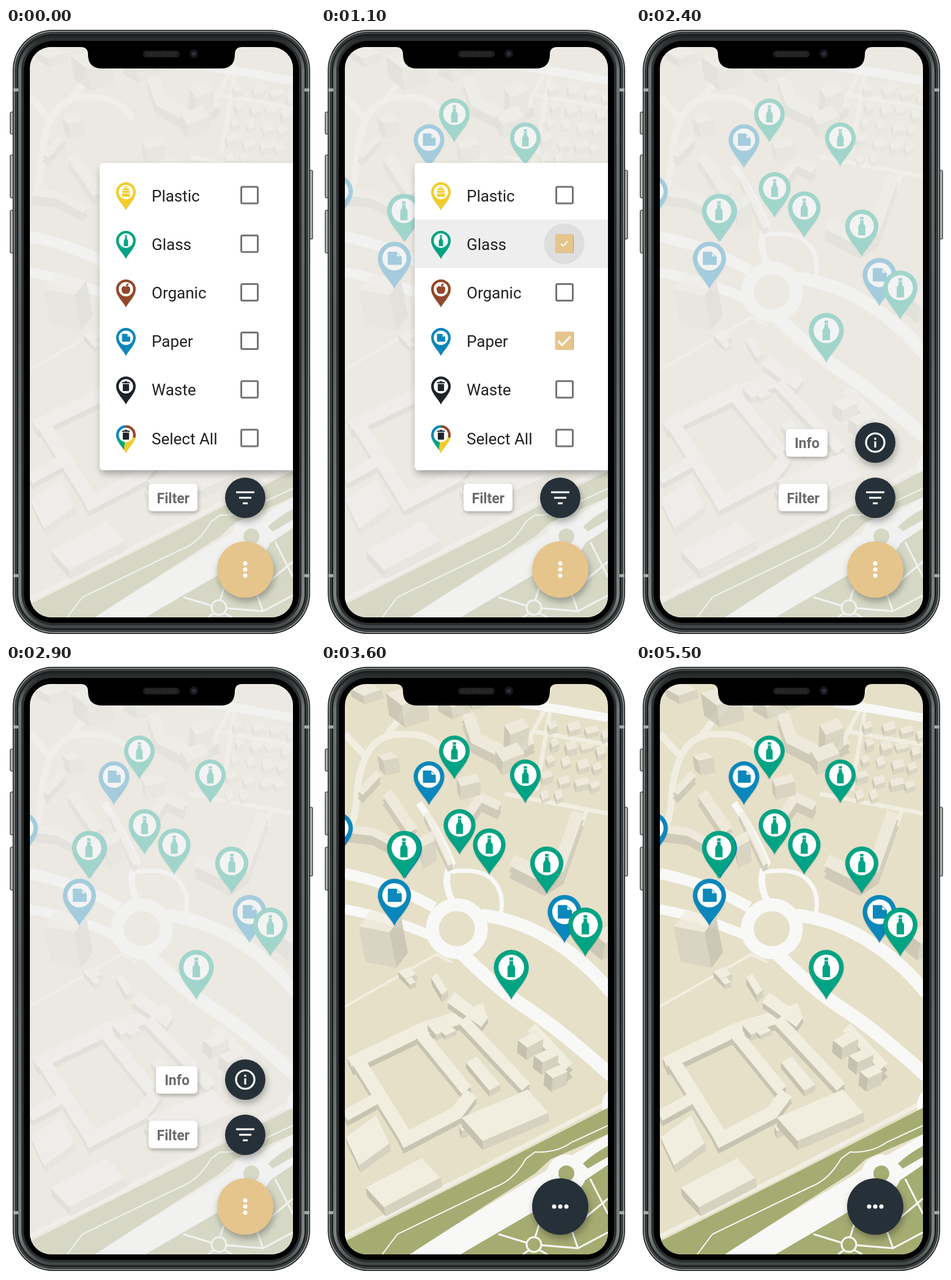
Write an HTML page that moves like this. It is 505 px wide and 993 px high and loops after 5600 ms.

```html
<!DOCTYPE html>
<html lang="en">
<head>
<meta charset="utf-8">
<title>Recycling map filter</title>
<style>
html, body { margin: 0; width: 100%; height: 100%; overflow: hidden; background: #fff; }
svg { display: block; width: 100vw; height: 100vh; }
text { font: 26px Roboto, sans-serif; fill: #212121; }
.tag text { font-size: 23px; font-weight: 700; fill: #6b6b6b; text-anchor: end; }
.soft { filter: drop-shadow(1px 3px 3px rgba(0,0,0,.28)); }
.faint { filter: drop-shadow(0 1px 1px rgba(0,0,0,.18)); }
.lift { filter: drop-shadow(2px 6px 6px rgba(0,0,0,.3)); }
.road { fill: none; stroke: #f8f8f6; }
.lane { fill: none; stroke: #f1eee1; }
</style>
</head>
<body>
<svg viewBox="0 0 505 993" preserveAspectRatio="none">
  <defs>
    <clipPath id="screen"><rect x="39" y="31" width="430" height="930" rx="35"/></clipPath>
    <path id="pin" d="M0 46C-5 34-25 18-25 0A25 25 0 1 1 25 0C25 18 5 34 0 46Z"/>
    <clipPath id="pinClip"><use href="#pin"/></clipPath>
    <linearGradient id="rim" x2="0" y2="1">
      <stop stop-color="#202423"/><stop offset=".06" stop-color="#6f7476"/>
      <stop offset=".5" stop-color="#5c6063"/><stop offset=".95" stop-color="#7d8283"/>
      <stop offset="1" stop-color="#3f4443"/>
    </linearGradient>
  </defs>

  <g id="phone"></g>

  <g clip-path="url(#screen)">
    <path fill="#e6e0c9" d="M39 31h430v930H39z"/>
    <g class="lane">
      <path stroke-width="11" d="M48 262C60 245 56 205 63 180C72 140 90 115 125 113C170 110 190 122 207 150M72 148L39 112M107 115L165 40M170 60L240 78"/>
      <path stroke-width="7" d="M375 31L366 72L330 140M469 130L345 108M300 210L469 242M435 235L392 352M375 70L352 205"/>
      <path stroke-width="4" d="M39 557L188 472L215 485"/>
      <path stroke-width="7" d="M39 932L250 827L469 713"/>
    </g>
    <g class="road">
      <path stroke-width="14" d="M325 62L390 72L469 86"/>
      <path stroke-width="18" d="M39 340Q115 355 185 395"/>
      <path stroke-width="16" d="M39 398Q115 412 186 444"/>
      <path stroke-width="21" d="M262 408Q330 415 395 460Q440 492 475 535"/>
      <path stroke-width="22" d="M232 472Q290 530 340 562T475 670"/>
      <path stroke-width="11" d="M216 388Q196 350 214 322Q195 275 160 225"/>
      <path stroke-width="7" d="M212 337Q260 330 280 350T294 404"/>
      <ellipse cx="222" cy="430" rx="40" ry="39" stroke-width="21"/>
    </g>
    <path fill="#f8f8f6" d="M140 961L360 829L469 765V825L235 961Z"/>
    <circle cx="491" cy="718" r="32" fill="#f8f8f6"/>
    <g fill="#a5ac72">
      <path d="M39 940L250 834L469 722V765L375 806L350 829L145 961H39Z"/>
      <path d="M228 961L350 890L405 858L469 815V961Z"/>
      <path d="M428 813Q445 797 469 784V802L436 821Z"/>
    </g>
    <circle cx="401" cy="830" r="32" fill="#f8f8f6"/>
    <circle cx="401" cy="829" r="13" fill="#a5ac72"/>
    <path class="road" stroke-width="2" d="M100 961L125 928L285 851Q315 840 335 805L350 794Q385 796 410 778L469 751"/>
    <path class="road" stroke-width="3" d="M290 928L336 942M360 946L420 951L469 925M350 933L362 895M340 954L330 961M357 954L370 961M420 951L409 920L469 870M440 838L469 895M409 920L365 895"/>
    <circle class="road" cx="348" cy="945" r="12" stroke-width="3"/>

    <g id="north" opacity=".75"></g>
    <g id="south"></g>
    <g id="pins"></g>
    <path id="veil" fill="#eee" d="M39 31h430v930H39z"/>

    <g id="actions">
      <g class="tag"><rect class="soft" x="245" y="654" width="68" height="45" rx="6" fill="#fff"/><text x="300" y="685">Info</text></g>
      <circle class="lift" cx="391" cy="676" r="33" fill="#263038"/>
      <g fill="none" stroke="#fff" stroke-width="3.2"><circle cx="391" cy="676" r="15"/><path d="M391 674v10M391 668v3.4"/></g>
      <g class="tag"><rect class="soft" x="233" y="743" width="80" height="45" rx="6" fill="#fff"/><text x="300" y="775">Filter</text></g>
      <circle class="lift" cx="391" cy="766" r="33" fill="#263038"/>
      <path stroke="#fff" stroke-width="3.2" d="M376 757h30M381 766h20M387 775h8"/>
    </g>

    <g id="panel">
      <rect class="lift" x="153" y="220" width="330" height="501" rx="6" fill="#fff"/>
      <g id="rows"></g>
    </g>

    <circle id="main" class="lift" cx="391" cy="883" r="46"/>
    <g id="dots" fill="#fff"><circle cx="-10" r="3.5"/><circle r="3.5"/><circle cx="10" r="3.5"/></g>
  </g>

  <path d="M122 31h264q-12 0-12 12q0 23-23 23h-194q-23 0-23-23q0-12-12-12z"/>
  <rect x="224" y="37" width="60" height="11" rx="5.5" fill="#1d1d1e"/>
  <path stroke="#343436" stroke-width="7" stroke-dasharray="1 2" d="M229 42.5h50"/>
  <circle cx="307" cy="42" r="7" fill="#17181d"/>
  <circle cx="307" cy="42" r="3" fill="#30323f"/>
</svg>

<script>
const $ = id => document.getElementById(id);
const clamp = v => Math.max(0, Math.min(1, v));
const ramp = (t, start, length) => clamp((t - start) / length);
const easeOut = v => 1 - (1 - v) ** 3;

// Phone body: side buttons, nested rims, antenna lines
const bar = (x, y, h) =>
  `<rect x="${x}" y="${y}" width="6" height="${h}" rx="2" fill="#b4b7b0" stroke="#222" stroke-width="1.2"/>`;
const rim = (inset, fill) =>
  `<rect x="${11 + inset}" y="${3 + inset}" width="${486 - 2 * inset}" height="${985 - 2 * inset}" rx="${66 - inset}" fill="${fill}"/>`;
$('phone').innerHTML =
  bar(7, 137, 36) + bar(7, 207, 70) + bar(7, 297, 70) + bar(495, 232, 112) +
  rim(0, '#0c0f0e') + rim(1.5, '#a3a9a4') + rim(3, '#3a3e40') + rim(7, '#17191a') +
  rim(9, 'url(#rim)') + rim(14, '#2b2e30') + rim(18, '#000') +
  '<path stroke="#a9adad" stroke-width="5" d="M12 101h8M488 101h8M12 893h8M488 893h8"/>';

// Buildings: a roof parallelogram (corner, two edges) standing on walls of height h
function block([x, y, ax, ay, bx, by, h]) {
  const roof = [[x, y], [x + ax, y + ay], [x + ax + bx, y + ay + by], [x + bx, y + by]];
  const dx = (252 - x) * h * .001;
  const walls = roof.map((p, i) => ({ p, q: roof[(i + 1) % 4], fill: i % 2 ? '#c5c1ae' : '#d6d2bf' }));
  walls.sort((a, b) => a.p[1] + a.q[1] - b.p[1] - b.q[1]);
  return walls.map(({ p, q, fill }) =>
    `<path fill="${fill}" d="M${p}L${q}l${dx} ${h}L${p[0] + dx} ${p[1] + h}Z"/>`).join('') +
    `<path fill="#f1eddf" d="M${roof.join('L')}Z"/>`;
}
// Long wings: a thick path with its shaded side below
function wing(d, width, h) {
  const line = (y, color) =>
    `<path d="${d}" transform="translate(0 ${y})" fill="none" stroke="${color}" stroke-width="${width}"/>`;
  return line(h, '#c8c4b2') + line(h / 2, '#c8c4b2') + line(0, '#f1eddf');
}
const north = [
  [47, 38, 30, -10, 22, 12, 14], [106, 46, 40, -12, 26, 20, 36], [190, 55, 28, -12, 24, 14, 20],
  [235, 42, 30, -8, 12, 14, 18], [92, 147, 24, -5, 10, 9, 24], [222, 185, 32, -8, 6, 13, 22],
  [300, 98, 30, -12, 10, 16, 34], [285, 140, 36, -14, 12, 18, 22], [160, 282, 22, -12, 4, 16, 34],
  [62, 426, 50, 10, 19, -25, 58], [445, 438, 30, -16, 20, 16, 28]
];
const south = [
  [126, 500, 18, -8, 12, 12, 10], [138, 513, 10, -4, 7, 8, 8],
  [180, 510, 10, -8, 17, 28, 12], [174, 587, 26, -12, 14, 16, 10], [196, 598, 18, -8, 7, 6, 7],
  [237, 648, 18, -10, 38, 46, 10], [226, 752, 10, -4, 4, 8, 12], [40, 770, 50, -36, 22, 46, 12],
  [73, 852, 92, -48, 30, 32, 15], [230, 738, 108, -46, 34, 38, 15]
];
const houses = [[322, 612, 26, -14, 15, 12, 20], [348, 637, 26, -12, 14, 11, 20], [366, 663, 24, -11, 13, 11, 22]];
let seed = 7;
const rand = () => (seed = seed * 16807 % 2147483647) / 2147483647;
let homes = '';
for (let i = 0; i < 18; i++) {
  const row = i / 4 | 0, col = i % 4;
  homes += block([370 + col * 27 - row * 5 + rand() * 10, 88 + row * 28 + col * 5 + rand() * 8,
    10 + rand() * 12, -5, 4, 8 + rand() * 6, 6 + rand() * 6]);
}
$('north').innerHTML =
  wing('M240 80L254 120L298 142L345 118', 20, 16) + homes +
  wing('M42 267L85 272L130 296', 13, 15) + wing('M108 208L150 270', 18, 14) +
  wing('M64 208L94 176', 12, 13) + wing('M172 240L212 325', 10, 10) +
  wing('M240 245L260 215L292 230', 15, 15) + wing('M420 240L388 330L365 345L312 318', 20, 20) +
  north.map(block).join('');
$('south').innerHTML =
  wing('M48 650L165 594L268 562', 22, 9) + wing('M212 542L268 582', 20, 9) +
  wing('M60 644L142 775', 22, 8) + wing('M162 600L238 693', 20, 9) +
  wing('M130 778L222 730L246 698', 22, 9) + wing('M232 578L335 688', 18, 10) +
  wing('M39 735L88 708', 18, 9) + wing('M344 590L405 655', 17, 22) +
  south.map(block).join('') + houses.map(block).join('');

// Pins
const glyphs = {
  plastic: '<path d="M-4-15h8v4q6 3 6 9v14h-20v-14q0-6 6-9z"/><path stroke="#fff" stroke-width="2" d="M-10-4h20M-10 3h20M-5-11h10"/>',
  glass: '<path d="M-2.6-14h5.2v10q2.8 2 2.8 5v13h-10.8v-13q0-3 2.8-5z"/><path stroke="#fff" stroke-width="1" d="M-4-9.5h8"/>',
  organic: '<path d="M0-6C-6-10-12-6-11 2C-10 9-5 14 0 11C5 14 10 9 11 2C12-6 6-10 0-6Z"/><path d="M0-7q0-7 7-8q0 7-7 8z"/>',
  paper: '<path d="M-10-9q0-1 1-1h12l8 8v11q0 1-1 1h-19q-1 0-1-1z"/><path fill="#fff" d="M4-8v5h5z"/>',
  waste: '<path d="M-10-11h6l1-2h6l1 2h6v3h-20zM-8-6h16v16q0 2-2 2h-12q-2 0-2-2z"/>'
};
const colors = { plastic: '#f2cd2b', glass: '#00a383', organic: '#93482a', paper: '#0b87bb', waste: '#1d2328' };
function pin(kind, x, y, r) {
  const glyph = kind === 'all' ? 'waste' : kind, color = colors[glyph];
  const body = kind === 'all'
    ? `<g clip-path="url(#pinClip)"><path fill="${colors.paper}" d="M-30-30H0V0L-30 18z"/><path fill="${colors.organic}" d="M0-30H30V12L0 0z"/><path fill="${colors.glass}" d="M0 0L-30 16V50H-6z"/><path fill="${colors.plastic}" d="M0 0L30 10V50H-7z"/></g>`
    : `<use href="#pin" fill="${color}"/>`;
  return `<g class="faint" transform="translate(${x} ${y}) scale(${r / 25})">${body}<circle r="18.3" fill="#fff"/><g fill="${color}">${glyphs[glyph]}</g></g>`;
}
const spots = [
  ['glass', 218, 140, 25], ['paper', 176.5, 182, 25], ['glass', 334, 179, 25], ['glass', 226.5, 261, 26],
  ['paper', 26, 266, 26], ['glass', 275, 293, 26.5], ['paper', 138, 298, 27], ['glass', 135.5, 298, 27.5],
  ['glass', 369, 323, 27], ['paper', 120, 375.5, 27], ['paper', 398, 402.5, 27.5], ['glass', 432, 423.5, 28],
  ['glass', 311, 493, 28.5]
];
$('pins').innerHTML = spots.map(s => `<g class="${s[0]}">${pin(...s)}</g>`).join('');

// Filter rows
const kinds = ['plastic', 'glass', 'organic', 'paper', 'waste', 'all'];
const names = ['Plastic', 'Glass', 'Organic', 'Paper', 'Waste', 'Select All'];
$('rows').innerHTML = kinds.map((kind, i) => `<g transform="translate(0 ${272.5 + i * 79.2})">
  <g id="press-${kind}" opacity="0"><path fill="#eee" d="M153-39.5h330v79H153z"/><circle cx="397.5" r="33" fill="#dedede"/></g>
  ${pin(kind, 196, -5, 16)}<text x="238" y="10">${names[i]}</text>
  <rect x="384.5" y="-13.5" width="27" height="27" rx="2" fill="none" stroke="#757575" stroke-width="3"/>
  <g id="check-${kind}"><rect x="382.5" y="-15" width="30" height="30" rx="3" fill="#e6c58c"/>
  <path fill="none" stroke="#fff" stroke-width="3.2" d="M-10 0L-3.5 7L10-7"/></g></g>`).join('');

function tap(kind, t, start) {
  $('press-' + kind).setAttribute('opacity', ramp(t, start, 100) - ramp(t, start + 280, 200));
  const on = ramp(t, start + 100, 180);
  const mark = $('check-' + kind);
  mark.setAttribute('opacity', on > 0 ? 1 : 0);
  mark.lastElementChild.setAttribute('transform', `translate(397.5 0) scale(${on})`);
}
const show = (kind, opacity) =>
  document.querySelectorAll('#pins > .' + kind).forEach(g => g.setAttribute('opacity', opacity));

kinds.forEach(kind => $('check-' + kind).setAttribute('opacity', 0));

function draw(now) {
  const t = Math.floor(now % 5600 / 100) * 100; // the motion runs at ten steps a second
  tap('paper', t, 200);
  tap('glass', t, 900);
  show('paper', ramp(t, 700, 200));
  show('glass', ramp(t, 900, 200));

  const fade = ramp(t, 2100, 260) ** 2;
  $('panel').setAttribute('opacity', 1 - fade);

  const close = easeOut(ramp(t, 2900, 300));
  $('veil').setAttribute('opacity', .68 * (1 - close));
  $('actions').setAttribute('opacity', 1 - close);
  $('main').setAttribute('fill', t < 2950 ? '#e6c58c' : '#263038');
  $('dots').setAttribute('transform', `translate(391 883) rotate(${90 * (1 - close)})`);
  requestAnimationFrame(draw);
}
requestAnimationFrame(draw);
</script>
</body>
</html>
```
